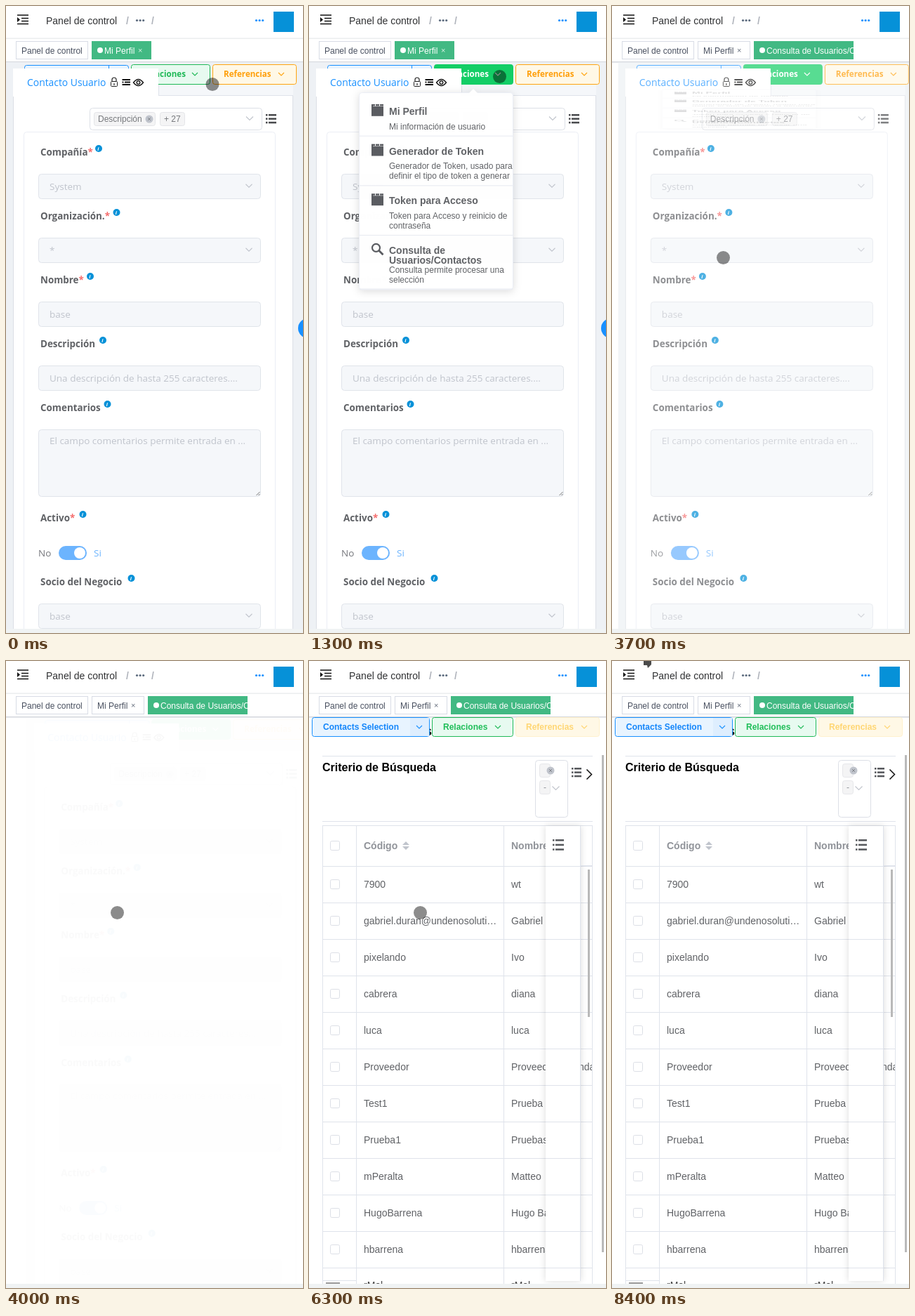
An HTML page for the animation above (8500 ms loop, 423 by 893 pixels).

```html
<!DOCTYPE html>
<html lang="es">
<head>
<meta charset="utf-8">
<style>
html, body { margin: 0; height: 100%; overflow: hidden; background: #fff; }
svg { display: block; width: 100vw; height: 100vh; }
text { font-family: "Liberation Sans", Arial, sans-serif; white-space: pre; }
.u { font-family: "Open Sans", "Noto Sans", sans-serif; }
.b { font-weight: 700; }
.soft { filter: drop-shadow(0 2px 6px rgba(0, 0, 0, .14)); }
.side { filter: drop-shadow(0 0 5px rgba(0, 0, 0, .14)); }
</style>
</head>
<body>
<svg id="stage" viewBox="0 0 423 893"></svg>
<script>
const BLUE = '#1890ff', GREEN = '#13ce66', GREY = '#606266', PALE = '#c0c4cc', LINE = '#dfe3eb';

const rect = (x, y, w, h, fill, stroke, r = 0) => stroke
  ? `<rect x="${x + .5}" y="${y + .5}" width="${w - 1}" height="${h - 1}" rx="${r}" fill="${fill}" stroke="${stroke}"/>`
  : `<rect x="${x}" y="${y}" width="${w}" height="${h}" rx="${r}" fill="${fill}"/>`;
const text = (x, y, s, size = 14, fill = GREY, cls = '') =>
  `<text x="${x}" y="${y}" font-size="${size}" fill="${fill}" class="${cls}">${s}</text>`;
const path = (d, stroke, w = 1, fill = 'none') =>
  `<path d="${d}" stroke="${stroke}" stroke-width="${w}" fill="${fill}"/>`;
const dot = (x, y, r, fill) => `<circle cx="${x}" cy="${y}" r="${r}" fill="${fill}"/>`;
const group = (id, s, extra = '') => `<g id="${id}" ${extra}>${s}</g>`;
const chevron = (x, y, c = PALE, s = 4.5) => path(`M${x - s} ${y - s / 2}l${s} ${s}l${s} ${-s}`, c, 1.1);
const hline = (x, y, x2, c = LINE) => path(`M${x} ${y + .5}H${x2}`, c);
const vline = (x, y, y2, c = LINE) => path(`M${x + .5} ${y}V${y2}`, c);
const dots = (x, y, c) => [0, 4.6, 9.2].map(d => dot(x + d, y, 1.6, c)).join('');
const closeDot = (x, y) => dot(x, y, 5.5, PALE) + path(`M${x - 2} ${y - 2}l4 4m0-4l-4 4`, '#85888e');
const list = (x, y, w, step, c) => [0, 1, 2].map(i =>
  rect(x, y + i * step, 2.5, 2.5, c) + rect(x + 4, y + i * step, w - 4, 2.5, c)).join('');

function header() {
  return rect(0, 0, 423, 80, '#fff')
    + path('M16 13H32M22 17.5H32M22 21.5H32M16 25.5H32', '#111', 1.6)
    + path('M16 16l4 3.5l-4 3.5z', 'none', 0, '#111')
    + text(57, 26, 'Panel de control', 14, '#303133')
    + text(171, 26, '/', 14, '#b0b4bc', 'b') + text(207, 26, '/', 14, '#b0b4bc', 'b')
    + dots(186.5, 20.5, '#5b6a7d') + dots(356.5, 20.5, BLUE)
    + rect(381, 8, 29, 29, '#0691d8')
    + hline(0, 45, 423, '#f4f5f6') + hline(0, 46, 423, '#eceef0')
    + hline(0, 79, 423, '#d3d6dc') + hline(0, 80, 423, '#e9ebee')
    + tag(14, 103, 'Panel de control')
    + group('tagsA', activeTag(122, 85, 'Mi Perfil') + text(188, 67, '×', 11, '#d5f0e3'))
    + group('tagsB', tag(122, 75, 'Mi Perfil') + text(178, 67, '×', 11, '#6a7280')
      + `<g clip-path="url(#tagClip)">${activeTag(202, 200, 'Consulta de Usuarios/Contactos')}</g>`);
}
const tag = (x, w, s) => rect(x, 50, w, 26, '#fff', '#d8dce5') + text(x + 8, 68, s, 12, '#495060');
const activeTag = (x, w, s) => rect(x, 50, w, 26, '#42b983')
  + dot(x + 12, 63, 4, '#fff') + text(x + 18, 68, s, 12, '#fff');

const label = (y, s, ix, required) =>
  text(49, y, s + (required ? '<tspan fill="#f56c6c">*</tspan>' : ''), 13.4, GREY, 'u b')
  + dot(ix, y - 10, 5, '#0691d8')
  + `<text x="${ix - 1.7}" y="${y - 7}" font-size="8" font-style="italic" font-weight="700" fill="#fff">i</text>`;
const field = (y, s, select, h = 36) => rect(46, y, 317, h, '#f5f7fa', '#e0e4ea', 4)
  + text(62, y + (h > 36 ? 21 : 23), s, 13.5, PALE, 'u') + (select ? chevron(346, y + 17) : '');

function relations(fill, border, ink) {
  return rect(178, 83, 113, 29, fill, border, 3)
    + text(194, 101, 'Relaciones', 11.6, ink, 'u b') + chevron(269, 97, ink, 4);
}
function formPage() {
  const tabIcons = rect(149, 107, 10, 8, '#fff', '#222', 1) + path('M151 107v-2a3 3 0 0 1 6 0v2M154 110v3', '#222', 1.2)
    + path('M165.500 105H177M169 108.500H177M165.500 112H177M165.500 108.500h2', '#111', 1.8)
    + path('M181.500 109Q188.500 100 195.500 109Q188.500 118 181.500 109z', '#111', 1.3)
    + `<circle cx="188.500" cy="109" r="2.300" fill="none" stroke="#111" stroke-width="1.300"/>`;
  return rect(0, 80, 423, 813, '#eef1f5')
    + rect(10, 89, 399, 810, '#fff', '#dcdfe6') + rect(10, 89, 399, 39, '#f5f7fa') + hline(10, 127, 409)
    + rect(26, 84, 149, 28, '#e8f4ff', BLUE, 3) + vline(146, 84, 90, BLUE)
    + group('plainBtn', relations('#e7faf0', '#1fb957', '#1fb957'))
    + group('solidBtn', relations(GREEN, GREEN, '#fff'))
    + rect(294, 83, 120, 29, '#fff8e6', '#ffa40f', 3)
    + text(310, 101, 'Referencias', 11.6, '#ff9f0a', 'u b') + chevron(392, 97, '#ffa40f', 4)
    + rect(10, 89, 207, 40, '#fff') + vline(217, 112, 128)
    + text(30, 114, 'Contacto Usuario', 13.9, BLUE, 'u') + tabIcons
    + rect(119, 145, 246, 32, '#fff', '#dcdfe6', 4)
    + rect(125, 151, 88, 20, '#f4f4f5', '#e4e5e8', 3) + text(131, 165, 'Descripción', 12, '#77797d') + closeDot(204, 161)
    + rect(219, 151, 36, 20, '#f4f4f5', '#e4e5e8', 3) + text(225, 165, '+ 27', 12, '#77797d')
    + chevron(347, 160, PALE, 5) + list(370, 154, 15, 5.4, '#48494c')
    + rect(25, 179, 359, 730, '#fff', '#ebeef5', 4)
    + label(213, 'Compañía', 132, 1) + field(239, 'System', 1)
    + label(304, 'Organización.', 157.5, 1) + field(330, '*', 1)
    + label(395, 'Nombre', 120, 1) + field(421, 'base')
    + label(486, 'Descripción', 138) + field(512, 'Una descripción de hasta 255 caracteres....')
    + label(577, 'Comentarios', 144.5) + field(603, 'El campo comentarios permite entrada en ...', 0, 96)
    + path('M356.500 697l5-5M359.500 697l2-2', '#777')
    + label(734, 'Activo', 109.5, 1)
    + text(46, 784, 'No', 13.5, '#74767b', 'u') + rect(75, 769, 40, 20, '#6cb4fe', '', 10)
    + dot(105, 779, 8, '#fff') + text(125, 784, 'Si', 13.5, '#6cb4fe', 'u')
    + label(825, 'Socio del Negocio', 178.5) + field(851, 'base', 1)
    + dot(430, 459, 14, BLUE);
}

function menu() {
  const box = y => rect(89, y + 3, 17, 14, '#5a5c61') + rect(89, y, 5, 2.5, '#5a5c61')
    + rect(95, y, 5, 2.5, '#5a5c61') + rect(101, y, 5, 2.5, '#5a5c61') + rect(89, y + 1, 2, 3, '#5a5c61');
  const item = (y, titles, notes, ny) => titles.map((s, i) => text(114, y + 14 * i, s, 14, GREY, 'b')).join('')
    + notes.map((s, i) => text(114, ny + 14 * i, s, 12)).join('');
  return `<g class="soft">${rect(71, 123, 220, 283, '#fff', '#ebeef5', 4)}${path('M228 124l6-6l6 6z', 'none', 0, '#fff')}</g>`
    + box(140) + item(155, ['Mi Perfil'], ['Mi información de usuario'], 176)
    + box(197) + item(212, ['Generador de Token'], ['Generador de Token, usado para', 'definir el tipo de token a generar'], 233)
    + box(268) + item(283, ['Token para Acceso'], ['Token para Acceso y reinicio de', 'contraseña'], 304)
    + `<circle cx="95.500" cy="345.500" r="5.500" fill="none" stroke="#5a5c61" stroke-width="2.200"/>`
    + path('M99.500 349.500l6 6', '#5a5c61', 2.8)
    + item(354, ['Consulta de', 'Usuarios/Contactos'], ['Consulta permite procesar una', 'selección'], 381)
    + [185, 256, 327, 404].map(y => hline(72, y, 290, '#e6e9f0')).join('');
}

const people = [
  ['7900', 'wt'], ['gabriel.duran@undenosoluti…', 'Gabriel'], ['pixelando', 'Ivo'], ['cabrera', 'diana'],
  ['luca', 'luca'], ['Proveedor', 'Proveedor'], ['Test1', 'Prueba'], ['Prueba1', 'Pruebas'],
  ['mPeralta', 'Matteo'], ['HugoBarrena', 'Hugo Barrena'], ['hbarrena', 'hbarrena']];

function tablePage() {
  const check = y => rect(30, y, 14, 14, '#fff', '#dcdfe6', 2);
  const lines = (a, b) => people.map((_, i) => hline(a, 344 + 52 * i, b)).join('');
  const rows = people.map(([code, name], i) => {
    const y = 323 + 52 * i;
    return check(y - 12) + text(78, y, code) + text(288, y, name);
  }).join('');
  return text(165, 106, 's', 18, '#111', 'b')
    + rect(4, 80, 168, 28, '#e8f4ff', BLUE, 3) + rect(144, 81, 27, 26, '#deeefe')
    + text(20, 98, 'Contacts Selection', 12, '#1486fa', 'b') + chevron(157, 94, BLUE, 4)
    + rect(175, 80, 116, 28, '#e7faf0', '#1fb957', 3) + text(191, 98, 'Relaciones', 12, '#1fbe58', 'b') + chevron(269, 94, '#1fb957', 4)
    + rect(294, 80, 120, 28, '#fff8e6', '#fff0cc', 3) + text(309, 98, 'Referencias', 12, '#ffd673', 'b') + chevron(392, 94, '#ffd673', 4)
    + hline(19, 135, 404) + hline(19, 228, 404) + text(19, 157, 'Criterio de Búsqueda', 16, '#000', 'b')
    + rect(322, 141, 47, 82, '#fff', '#dcdfe6', 4)
    + rect(328, 146, 16, 20, '#f4f4f5', '#e6e7ea', 3) + closeDot(344, 156)
    + rect(328, 170, 16, 20, '#f4f4f5', '#e6e7ea', 3) + text(334, 184, '-', 12, '#909399') + chevron(351.5, 181, PALE, 5)
    + list(374, 152, 14, 5.4, '#55575b') + path('M395.500 154.500l7 7l-7 7', '#111', 1.5)
    + hline(19, 234, 404) + hline(19, 292, 404) + lines(19, 404)
    + vline(19, 234, 893) + vline(67, 234, 893) + vline(277, 234, 893)
    + check(256) + text(78, 268, 'Código', 14, '#909399', 'b')
    + path('M133 262l5-5l5 5zM133 264l5 5l5-5z', 'none', 0, PALE) + text(288, 268, 'Nombre', 14, '#909399', 'b')
    + rows + text(384, 583, 'nda') + rect(404, 560, 12, 30, '#fff')
    + text(78, 894, 'rMol', 14, '#444') + text(288, 894, 'rMol', 14, '#444')
    + hline(19, 882, 67) + rect(24, 885, 20, 2, '#999')
    + `<g class="side">${rect(337, 235, 50, 648, '#fff')}</g>`
    + hline(337, 292, 387) + lines(337, 387) + vline(386, 235, 883)
    + list(347, 254, 16, 6.6, '#55575b')
    + hline(387, 291, 404) + vline(403, 234, 887) + rect(397, 297, 3, 210, '#b9b9b9')
    + rect(417, 134, 3, 708, '#b9b9b9');
}

const stage = document.getElementById('stage');
stage.innerHTML = `<defs><clipPath id="body">${rect(0, 80, 423, 807)}</clipPath>
  <clipPath id="tagClip">${rect(0, 46, 344, 34)}</clipPath></defs>`
  + rect(0, 0, 423, 893, '#fff') + header()
  + `<g clip-path="url(#body)">${group('form', formPage())}${group('table', tablePage())}</g>`
  + rect(0, 887, 423, 6, '#f0f3f4')
  + group('menu', menu())
  + group('tap', rect(178, 83, 113, 29, 'rgba(51,181,229,.4)') + dot(271.5, 100.5, 11.5, '#8fdcc6'))
  + group('cursor', dot(0, 0, 9.5, 'rgba(0,0,0,.45)'))
  + group('arrow', path('M45 0H56V5L51 10L50 6H45z', 'none', 0, '#4b4b4b'));
const el = {};
stage.querySelectorAll('g[id]').forEach(g => el[g.id] = g);

// pointer stops: time, x, y
const track = [[200, 294, 111.5], [400, 299.5, 128], [500, 297, 133.5], [800, 271.5, 100.5],
  [1700, 271.5, 100.5], [1900, 281.5, 112], [2200, 189.5, 250], [2300, 181.5, 305], [2400, 184.5, 345.5],
  [2700, 184.5, 345.5], [2800, 184.5, 346.5], [3100, 184.5, 346.5], [3300, 158.5, 358.5], [6600, 158.5, 358.5],
  [6700, 198.5, 521.5], [6800, 198.5, 521.5], [7100, 266.5, 400], [7600, 147.5, 212], [7700, 159.5, 192.5],
  [7800, 159.5, 192.5], [8400, 54, 0]];

function pointer(t) {
  const i = track.findIndex(k => k[0] > t);
  if (i === 0) return track[0].slice(1);
  if (i < 0) return track[track.length - 1].slice(1);
  const [a, b] = [track[i - 1], track[i]], p = (t - a[0]) / (b[0] - a[0]);
  return [1, 2].map(n => a[n] + (b[n] - a[n]) * p);
}
const clamp = v => Math.min(1, Math.max(0, v));
// CSS "ease": cubic-bezier(.25, .1, .25, 1)
function ease(x) {
  const at = (u, a, b) => 3 * (1 - u) * (1 - u) * u * a + 3 * (1 - u) * u * u * b + u ** 3;
  let lo = 0, hi = 1;
  for (let i = 0; i < 20; i++) {
    const mid = (lo + hi) / 2;
    at(mid, .25, .25) < x ? lo = mid : hi = mid;
  }
  return at(lo, .1, 1);
}
const quint = x => 1 - (1 - x) ** 4;
const show = (g, on) => g.style.display = on ? '' : 'none';
function slide(g, dx, alpha) {
  show(g, alpha > .001);
  g.setAttribute('transform', `translate(${dx} 0)`);
  g.setAttribute('opacity', alpha);
}

function draw(time) {
  const t = Math.floor(time % 8500 / 100) * 100;
  const left = ease(clamp((t - 3600) / 500)), came = ease(clamp((t - 5580) / 500));
  slide(el.form, 30 * left, t < 4100 ? 1 - left : .01);
  if (t >= 5600) show(el.form, false);
  slide(el.table, -30 * (1 - came), t < 5600 ? 0 : came);

  const open = quint(clamp((t - 1080) / 300)) * (1 - quint(clamp((t - 3600) / 300)));
  show(el.menu, open > .01);
  el.menu.setAttribute('opacity', open);
  el.menu.setAttribute('transform', `translate(0 ${118 * (1 - open)}) scale(1 ${open})`);

  show(el.plainBtn, t < 1000);
  show(el.solidBtn, t >= 1000);
  show(el.tap, t === 1000);
  show(el.tagsA, t < 3700);
  show(el.tagsB, t >= 3700);

  const [x, y] = pointer(t);
  show(el.cursor, t < 8400);
  show(el.arrow, t >= 8400);
  el.cursor.setAttribute('transform', `translate(${x} ${y})`);
  el.cursor.firstChild.setAttribute('fill', t === 1000 ? '#24695b' : 'rgba(0,0,0,.45)');
}
const start = performance.now();
function tick() {
  draw(performance.now() - start);
  requestAnimationFrame(tick);
}
tick();
</script>
</body>
</html>
```
